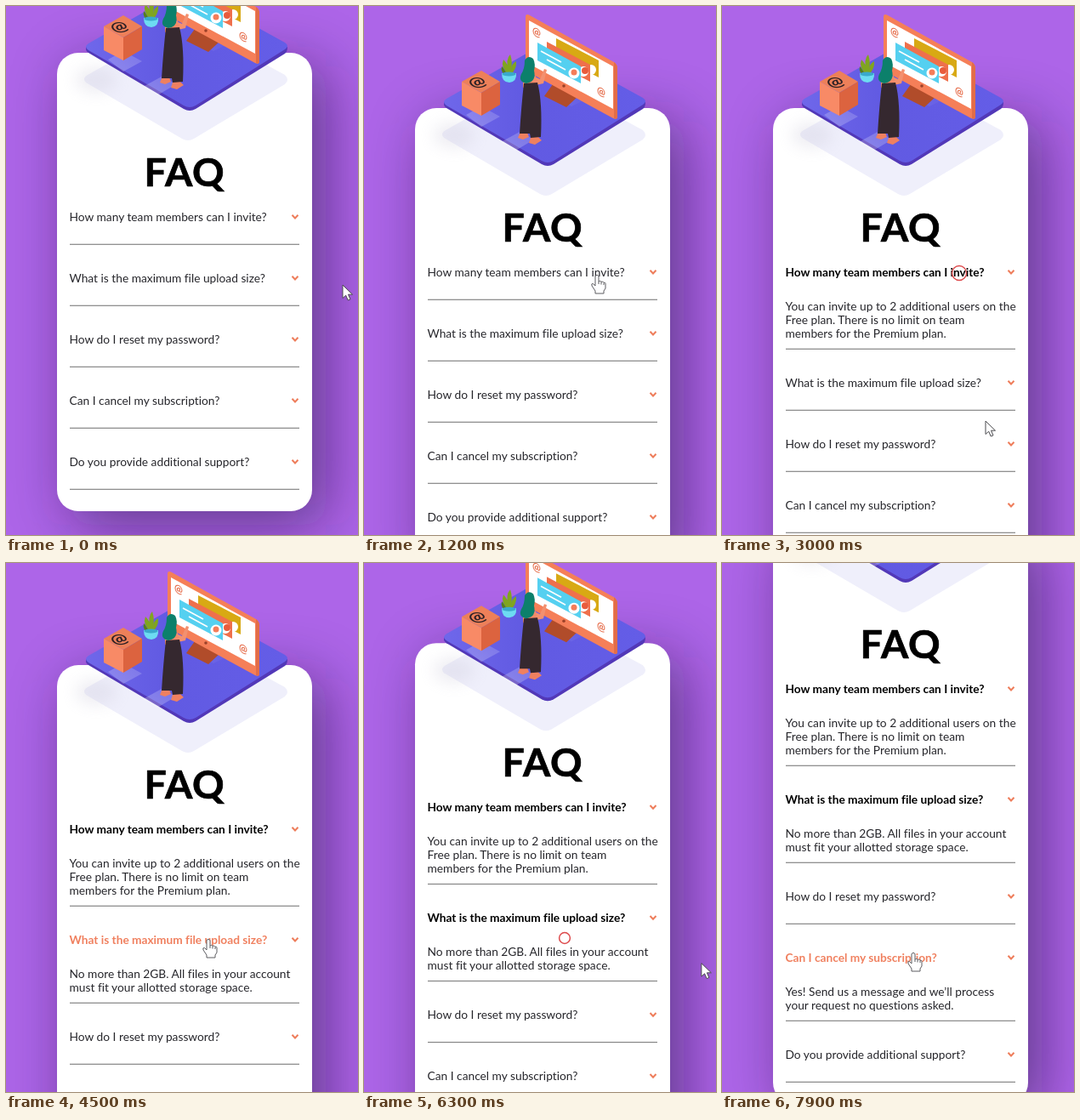
An HTML page that plays this animation: 414 by 622 pixels, repeating every 8 s.

```html
<!DOCTYPE html>
<html lang="en">
<head>
<meta charset="utf-8">
<title>FAQ accordion</title>
<style>
  html, body { margin: 0; width: 100%; height: 100%; overflow: hidden; background: #ad65e8; }
  svg { display: block; width: 414px; height: 622px; }
  text { font-family: Lato, "Open Sans", sans-serif; font-variant-ligatures: none; }
  .title { font-size: 46.5px; font-weight: 700; letter-spacing: .9px; text-anchor: middle; stroke: #000; stroke-width: .7; }
  .row text { font-size: 13.75px; fill: #26262b; }
  .row.open .question { font-size: 13.7px; font-weight: 700; fill: #000; }
  .row.hover .question { fill: #f0805f; }
  .row .answer { display: none; }
  .row.open .answer { display: inline; }
  .at { font-weight: 700; text-anchor: middle; }
</style>
</head>
<body>
<svg viewBox="0 0 414 622">
  <defs>
    <filter id="soft" filterUnits="userSpaceOnUse" x="-100" y="-60" width="660" height="1100">
      <feGaussianBlur stdDeviation="35"/>
    </filter>
    <filter id="haze" x="-1" y="-1" width="3" height="3">
      <feGaussianBlur stdDeviation="9"/>
    </filter>
    <linearGradient id="floor" x1="0" y1="0" x2="1" y2="0">
      <stop offset="0" stop-color="#6f67ea"/>
      <stop offset=".4" stop-color="#615ae2"/>
      <stop offset="1" stop-color="#645de7"/>
    </linearGradient>
    <linearGradient id="gleam" x1="1" y1="0" x2="0" y2="1">
      <stop offset="0" stop-color="#fff" stop-opacity="0"/>
      <stop offset="1" stop-color="#fff" stop-opacity=".3"/>
    </linearGradient>
  </defs>
  <rect width="414" height="622" fill="#ad65e8"/>
  <g id="page">
    <rect id="shade" x="76" y="136" width="300" rx="25" fill="#1c0838" opacity=".53" filter="url(#soft)"/>
    <rect id="card" x="60" y="120" width="300" rx="25" fill="#fff"/>

    <g id="scene">
      <path d="M96 146 210 82 328 146Q334 152 328 157L221 221Q214 225 207 221L94 155Q89 150 96 146Z" fill="#efeffb"/>
      <ellipse cx="106" cy="152" rx="24" ry="15" fill="#cfccdc" opacity=".35" filter="url(#haze)"/>
      <path d="M94 113V116Q94 118 97 120L209 186Q216 190 223 186L328 121Q331 119 331 113Z" fill="#5238b8"/>
      <path d="M97 109 205 48Q212 44 219 48L328 108Q334 112 328 116L223 182Q216 186 209 182L97 117Q91 113 97 109Z" fill="url(#floor)"/>
      <path d="M183 148 200 157 178 170 161 160ZM120 128 138 118 160 130 138 142ZM244 118 262 109 244 99 226 108Z" fill="url(#gleam)"/>

      <!-- crate -->
      <path d="M115 89 138 76 160 89 138 102Z" fill="#ed8059"/>
      <path d="M115 89 138 102V129L115 117Z" fill="#f88a66"/>
      <path d="M160 89 138 102V129L160 116Z" fill="#dc633f"/>
      <text class="at" transform="matrix(1 -.3 .6 .65 137 94)" font-size="21" fill="#2c2026">@</text>

      <!-- plant -->
      <path d="M171 82Q160 72 164 63Q170 69 170 76Q166 63 172 57Q175 66 173 75Q174 67 179 65Q180 75 171 82Z" fill="#80a51f"/>
      <path d="M169 82Q165 74 162 71Q160 79 169 82Z" fill="#577f1b"/>
      <path d="M162 79H179Q180 89 171 90Q162 90 162 79Z" fill="#6ddcf2"/>
      <ellipse cx="170.500" cy="80" rx="8" ry="2.500" fill="#3aa9cc"/>

      <!-- monitor -->
      <path d="M222 92 252 106 238 119 212 106Z" fill="#b14c2a"/>
      <path d="M190 13Q190 8 195 11L294 66Q298 69 298 73V130Q298 134 293 132L194 78Q190 76 190 72Z" fill="#f57f58"/>
      <path d="M294 66Q298 69 298 73V130Q298 134 294 132Z" fill="#e26d48"/>
      <path d="M194 17 293 71V121L194 68Z" fill="#fff"/>
      <circle cx="235" cy="94" r="1.800" fill="#9c4128"/>
      <path d="M226 38 276 64V84L226 58Z" fill="#d8a914"/>
      <circle cx="267" cy="75" r="6" fill="#fff"/>
      <path d="M215 42 266 69V89L215 62Z" fill="#ef704c"/>
      <circle cx="258" cy="77" r="6" fill="#fff"/>
      <circle cx="260" cy="76" r="4" fill="#e95c3c"/>
      <path d="M204 43 255 71V91L204 64Z" fill="#55d0f0"/>
      <circle cx="247" cy="79" r="6.500" fill="#fff"/>
      <circle cx="247" cy="78" r="3.500" fill="#f47d59"/>
      <path d="M208 53 232 66M215 63 237 75" stroke="#fff" stroke-width="1.600"/>
      <g fill="#e66f4d" font-size="13">
        <text class="at" transform="matrix(.9 .4 0 1 203 35)">@</text>
        <text class="at" transform="matrix(.9 .4 0 1 279 105)">@</text>
      </g>

      <!-- figure -->
      <path d="M184 148 192 149 194 154 187 157 181 155ZM197 152 204 153 209 158 201 163 194 161Z" fill="#ef8060"/>
      <path d="M198 82 207 86 212 74 215 75 211 91 202 93Z" fill="#f3906f"/>
      <path d="M187 86 202 82 204 96H187Z" fill="#f28b69"/>
      <path d="M188 91 204 90Q210 113 208 154L196 155 195 150 183 150Q185 118 188 91Z" fill="#35282f"/>
      <path d="M189 64Q193 57 199 62Q202 68 200 76Q203 89 191 91Q181 89 185 80Q189 74 189 64Z" fill="#0c806b"/>
    </g>

    <text class="title" x="210" y="277">FAQ</text>
    <g id="rows"></g>
  </g>
  <circle id="ring" fill="none" stroke="#dd4a4c"/>
  <g id="cursor" stroke-linejoin="round">
    <path id="arrow" d="M0 0V15.500L3.700 12.200 6.200 18 9 16.800 6.500 11.200H11.500Z" fill="#fff" stroke="#4a4a4e"/>
    <path id="hand" d="M-2 1.500Q0-1 2 1.500V8Q4 6.500 5 8.300Q7 7.300 8 9.300Q10.500 8.500 10 12V16L8 19V22H-2V19L-6 13Q-7 10 -4.500 10.500L-2 13Z M2 8V11M5 8.500V11.500M8 9.500V12" fill="#fff" stroke="#5c5c60"/>
  </g>
</svg>
<script>
const LOOP = 8000, STEP = 100;
const $ = id => document.getElementById(id);

const faqs = [
  { q: 'How many team members can I invite?', opens: 1500, hover: [1300, 2000],
    a: ['You can invite up to 2 additional users on the', 'Free plan. There is no limit on team', 'members for the Premium plan.'] },
  { q: 'What is the maximum file upload size?', opens: 4200, hover: [4000, 4900],
    a: ['No more than 2GB. All files in your account', 'must fit your allotted storage space.'] },
  { q: 'How do I reset my password?' },
  { q: 'Can I cancel my subscription?', opens: 7600, hover: [7200, 8000],
    a: ['Yes! Send us a message and we’ll process', 'your request no questions asked.'] },
  { q: 'Do you provide additional support?' }
];

// Keyframes: [time, ...values]
const scrollKeys = [[300, 65], [600, 0], [6200, 0], [6600, 165]];
const cursorKeys = [
  [0, 396, 328], [900, 354, 345], [1200, 274, 316], [1900, 278, 314],
  [2300, 398, 400], [2700, 322, 484], [3000, 310, 488], [3400, 308, 490],
  [4000, 236, 441], [4500, 238, 442], [4800, 238, 442], [5000, 350, 455],
  [5600, 412, 462], [5900, 425, 464], [6200, 425, 470], [6600, 245, 474],
  [6900, 245, 474], [7300, 232, 462], [7900, 225, 458]
];
const handSpans = [[1100, 2000], [3900, 4900], [6600, 8000]];
const clicks = [
  { x: 279, y: 314, from: 1600, to: 4000, start: 1560 },
  { x: 236, y: 441, from: 4700, to: 7000, start: 4600 }
];

const within = (t, [from, to]) => t >= from && t < to;

function track(keys, t) {
  const next = keys.findIndex(k => k[0] > t);
  if (next === 0) return keys[0].slice(1);
  if (next < 0) return keys[keys.length - 1].slice(1);
  const a = keys[next - 1], b = keys[next];
  const u = (t - a[0]) / (b[0] - a[0]);
  const eased = u * u * (3 - 2 * u);
  return a.slice(1).map((v, i) => v + (b[i + 1] - v) * eased);
}

$('rows').innerHTML = faqs.map(({ q, a = [] }) => `<g class="row">
  <text class="question" x="74.5" y="4.500">${q}</text>
  <path d="M336.500 -2.200 340 1.500 343.500 -2.200" fill="none" stroke="#ee7d5b" stroke-width="2"/>
  ${a.map((line, i) => `<text class="answer" x="74.5" y="${44.5 + 16 * i}">${line}</text>`).join('')}
  <rect class="rule" x="75" width="270" height="1.200" fill="#858585"/>
</g>`).join('');
const rows = [...document.querySelectorAll('.row')];

function layoutRows(t) {
  let y = 313;
  faqs.forEach((faq, i) => {
    const open = t >= faq.opens;
    const extra = open ? 10 + 16 * faq.a.length : 0;
    const row = rows[i];
    row.classList.toggle('open', open);
    row.classList.toggle('hover', !!faq.hover && within(t, faq.hover));
    row.setAttribute('transform', `translate(0 ${y})`);
    row.querySelector('.rule').setAttribute('y', 31.7 + extra);
    y += 72 + extra;
  });
  const height = y - 14 - 120;
  $('card').setAttribute('height', height);
  $('shade').setAttribute('height', height);
}

function drawRing(t) {
  const click = clicks.find(c => within(t, [c.from, c.to]));
  $('ring').style.display = click ? '' : 'none';
  if (!click) return;
  const held = Math.min(t, 6600);
  const r = Math.max(0, Math.min(14, 20 - (held - click.start) * 0.008));
  $('ring').setAttribute('cx', click.x);
  $('ring').setAttribute('cy', click.y);
  $('ring').setAttribute('r', r);
  $('ring').setAttribute('stroke-width', 1.1 + Math.max(0, 12 - r) * 0.07);
}

function drawCursor(t) {
  const hand = handSpans.some(span => within(t, span));
  $('cursor').setAttribute('transform', `translate(${track(cursorKeys, t).join(' ')})`);
  $('hand').style.display = hand ? '' : 'none';
  $('arrow').style.display = hand ? 'none' : '';
}

function render(now) {
  const t = Math.floor((now % LOOP) / STEP) * STEP;
  $('page').setAttribute('transform', `translate(0 ${-track(scrollKeys, t)[0]})`);
  layoutRows(t);
  drawRing(t);
  drawCursor(t);
}

const began = performance.now();
function tick() {
  render(performance.now() - began);
  requestAnimationFrame(tick);
}
tick();
</script>
</body>
</html>
```
